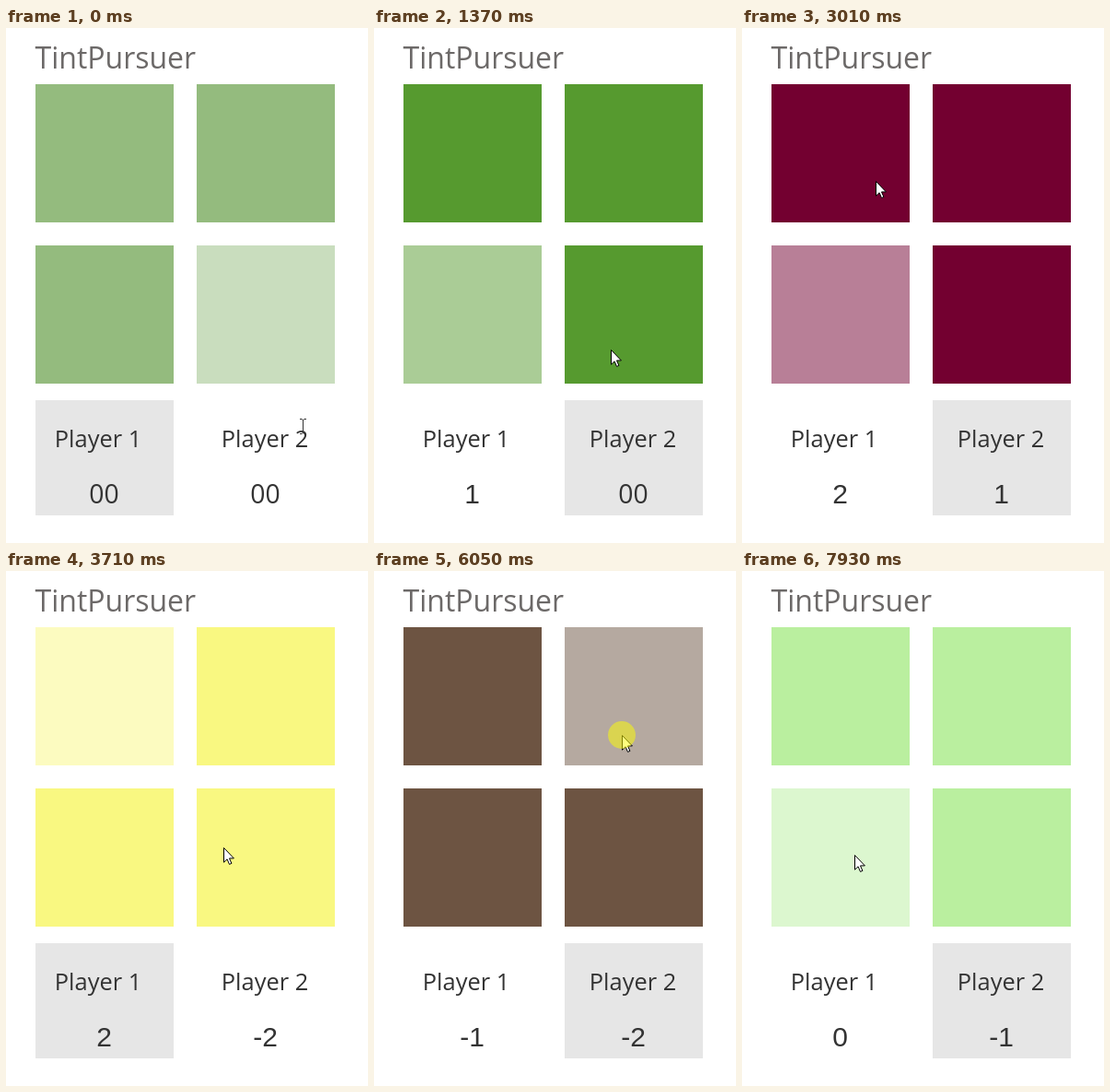
An HTML page that plays this animation: 393 px wide and 559 px high, repeating every 8000 ms.

```html
<!DOCTYPE html>
<html lang="en">
<head>
<meta charset="utf-8">
<title>TintPursuer</title>
<style>
  html, body { margin: 0; width: 100%; height: 100%; overflow: hidden; background: #fff; }
  svg { display: block; width: 393px; height: 559px; }
  text { font-family: "Open Sans", "Noto Sans", sans-serif; fill: #333; }
  .title { font-size: 32px; fill: #6c6968; }
  .player { font-size: 25.4px; }
  .score { font-family: "Liberation Sans", Arial, sans-serif; font-size: 30px; text-anchor: middle; }
  .score.fresh { font-family: "Open Sans", "Noto Sans", sans-serif; font-size: 28.3px; }
  .panel { fill: #e6e6e6; }
</style>
</head>
<body>
<svg viewBox="0 0 393 559">
  <text class="title" x="31.5" y="44">TintPursuer</text>
  <g id="tiles"></g>
  <rect id="panel" class="panel" y="404" width="150" height="125"/>
  <text class="player" x="52.8" y="455">Player 1</text>
  <text class="player" x="233.8" y="455">Player 2</text>
  <text class="score" x="106.5" y="516"></text>
  <text class="score" x="281.5" y="516"></text>
  <g id="pointer">
    <path id="arrow" d="M.5 .5V16.2L4.1 12.8L6.5 18.4L8.9 17.4L6.5 11.9H11.4Z" fill="#fff" stroke="#000"/>
    <path id="beam" d="M-3 -7.5H-1L.5 -6.5L2 -7.5H4M.5 -6.5V7.5M-3 8.5H-1L.5 7.5L2 8.5H4" fill="none" stroke="#333"/>
    <circle id="click" r="15" fill="#ff0" fill-opacity=".5"/>
  </g>
</svg>
<script>
const LOOP = 8000;
const LEFT = 32, TOP = 61, SIZE = 150, PITCH = 175;
const PRESS = 130;   // the click mark stays this long, then the next turn begins
const PAUSE = 280;   // from a click to the next pointer move
const SETTLE = 60;   // pointer at rest before a click

// Each turn ends with a click at (x, y); sway bends the way there sideways
const turns = [
  { color: '#94bb7e', odd: 3, at: 1220, x: 257, y: 349, sway: -123 },
  { color: '#569a2f', odd: 2, at: 2090, x: 111, y: 273 },
  { color: '#5f7fb0', odd: 0, at: 2800, x: 145, y: 166 },
  { color: '#730030', odd: 2, at: 3570, x: 236, y: 300 },
  { color: '#f9f881', odd: 0, at: 4740, x: 129, y: 321 },
  { color: '#6d5442', odd: 1, at: 6050, x: 269, y: 178 },
  { color: '#f43622', odd: 3, at: 7162, x: 256, y: 315, sway: -177 },
  { color: '#baef9f', odd: 2, at: LOOP, x: 122, y: 308 }
];
const home = { at: -230, x: 322, y: 432 };

const byId = id => document.getElementById(id);
const scores = [...document.querySelectorAll('.score')];
const setAttrs = (el, attrs) => Object.entries(attrs).forEach(([k, v]) => el.setAttribute(k, v));
const show = (id, on) => setAttrs(byId(id), { visibility: on ? 'visible' : 'hidden' });

const tiles = Array.from({ length: 4 }, (_, i) => {
  const tile = document.createElementNS('http://www.w3.org/2000/svg', 'rect');
  setAttrs(tile, { x: LEFT + i % 2 * PITCH, y: TOP + (i >> 1) * PITCH, width: SIZE, height: SIZE });
  return byId('tiles').appendChild(tile);
});
const tileAt = ({ x, y }) => Math.floor((x - LEFT) / PITCH) + 2 * Math.floor((y - TOP) / PITCH);

// Players alternate: the odd tile earns a point, any other costs three
function scoreOf(player, turnIndex) {
  const played = turns.slice(0, turnIndex).filter((_, i) => i % 2 === player);
  if (!played.length) return '00';
  return String(played.reduce((sum, turn) => sum + (tileAt(turn) === turn.odd ? 1 : -3), 0));
}

function pointerAt(t) {
  const i = turns.findIndex(turn => t < turn.at + PAUSE);
  const from = turns[i - 1] ?? home, to = turns[i];
  const start = from.at + PAUSE, end = to.at - SETTLE;
  const p = Math.min(1, Math.max(0, (t - start) / (end - start)));
  const k = p * p * (3 - 2 * p);
  const bend = 2 * k * (1 - k) * (to.sway ?? 0);
  return [from.x + (to.x - from.x) * k + bend, from.y + (to.y - from.y) * k];
}

let shown = -1;
function drawTurn(index) {
  if (index === shown) return;
  shown = index;
  const { color, odd } = turns[index];
  tiles.forEach((tile, i) => setAttrs(tile, { fill: color, opacity: i === odd ? 0.5 : 1 }));
  setAttrs(byId('panel'), { x: LEFT + index % 2 * PITCH });
  scores.forEach((score, player) => {
    score.textContent = scoreOf(player, index);
    score.classList.toggle('fresh', score.textContent === '00');
  });
}

function draw(time) {
  const t = time % LOOP;
  const index = turns.findIndex(turn => t < turn.at + PRESS);
  const [x, y] = pointerAt(t).map(Math.round);
  drawTurn(index);
  setAttrs(byId('pointer'), { transform: `translate(${x} ${y})` });
  show('beam', y > 420);
  show('arrow', y <= 420);
  show('click', t >= turns[index].at);
}

let origin;
function tick(now) {
  origin ??= now;
  draw(now - origin);
  requestAnimationFrame(tick);
}
draw(0);
requestAnimationFrame(tick);
</script>
</body>
</html>
```
